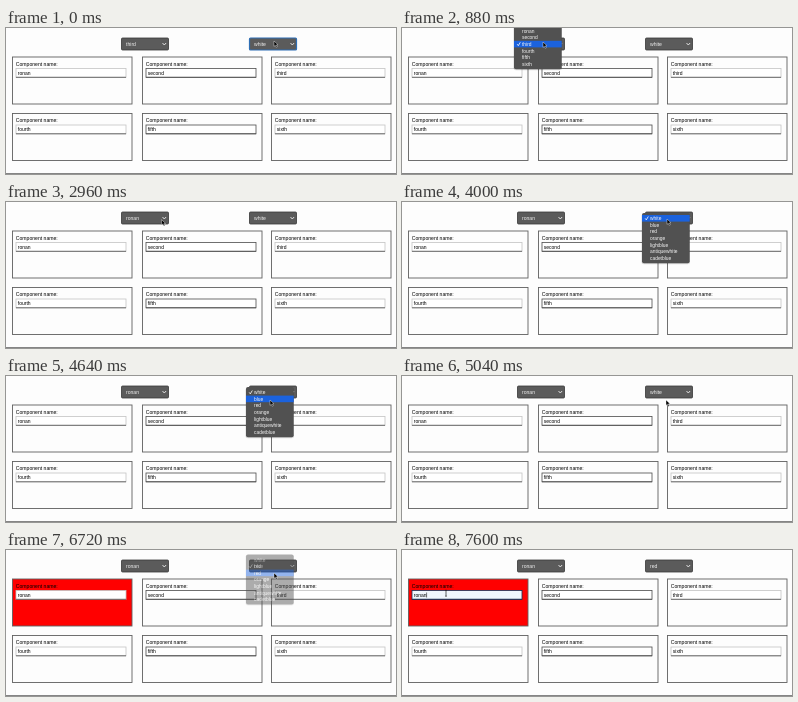
Write an HTML page that moves like this. It is 390 by 146 pixels and loops after 8 s.

```html
<!DOCTYPE html>
<html lang="en">
<head>
<meta charset="utf-8">
<title>Component colours</title>
<style>
html, body { margin: 0; width: 100%; height: 100%; overflow: hidden; background: #fdfdfd; }
svg { display: block; width: 390px; height: 146px; font: 5.1px "Liberation Sans", Arial, sans-serif; }
</style>
</head>
<body>
<svg id="stage" viewBox="0 0 390 146"></svg>
<script>
const stage = document.getElementById('stage');
const names = ['ronan', 'second', 'third', 'fourth', 'fifth', 'sixth'];
const colors = ['white', 'blue', 'red', 'orange', 'lightblue', 'antiquewhite', 'cadetblue'];
const LOOP = 8000, STEP = 80, ROW = 6.6;

// Pointer stops: time, x, y
const path = [
  [0, 268, 13], [80, 262, 13], [320, 140, 7], [480, 140, 9], [640, 141, 14],
  [1440, 141, 14], [1840, 141, 3], [2320, 141, 3], [2640, 142, 9], [2800, 143, 11],
  [3040, 160, 20], [3280, 194, 40], [3440, 225, 36], [3680, 265, 17],
  [4160, 265, 17], [4560, 264, 24], [5120, 264, 24], [5440, 267, 16],
  [5840, 267, 16], [6160, 268, 23], [6800, 268, 23], [7360, 44, 43], [LOOP, 44, 43]
];

// Menus: open, start of fade, end, left, top of first row, items, checked index
const menus = [
  [640, 2080, 2320, 112, -0.4, names, 2],
  [3840, 4800, 5040, 240, 13, colors, 0],
  [5520, 6560, 6800, 240, 6.4, colors, 1]
];

const rect = (x, y, w, h, fill, more = '') =>
  `<rect x="${x}" y="${y}" width="${w}" height="${h}" fill="${fill}" ${more}/>`;
const text = (x, y, s, fill = '#000', size = 5.1) =>
  `<text x="${x}" y="${y}" fill="${fill}" font-size="${size}">${s}</text>`;
const line = (d, color, width = 1) =>
  `<path d="${d}" fill="none" stroke="${color}" stroke-width="${width}"/>`;

function pointerAt(t) {
  const i = path.findIndex(p => p[0] > t);
  const [t0, x0, y0] = path[i - 1], [t1, x1, y1] = path[i];
  const u = (t - t0) / (t1 - t0), k = u * u * (3 - 2 * u);
  return [x0 + (x1 - x0) * k, y0 + (y1 - y0) * k];
}

function card(i, fill, focused) {
  const col = i % 3, x = [6.5, 136.5, 265.5][col], y = i < 3 ? 29 : 85.5;
  const ix = x + 3.5, iy = y + 11.5;
  const edge = focused ? '#182f55' : col === 1 ? '#4c4c4c' : '#c4c4c4';
  return rect(x, y, 119.5, 47, fill, 'stroke="#606060" stroke-width=".9"') +
    text(x + 3.3, y + 8.6, 'Component name:') +
    rect(ix, iy, 110, 8.8, focused ? '#f0f5fc' : '#fff', `stroke="${edge}" stroke-width=".8"`) +
    line(`M${ix} ${iy + 8.8}h110`, focused ? edge : '#505050', .8) +
    text(ix + 1.8, iy + 6.2, names[i], '#000', 5) +
    (focused ? line(`M${ix + 14.6} ${iy + 2}v5`, '#000', .5) : '');
}

function select(x, value, focused) {
  return rect(x, 10, 47, 12, '#5b5b5b',
      `rx="1" stroke="${focused ? '#2f6fb5' : '#383838'}" stroke-width="${focused ? 1.2 : .8}"`) +
    text(x + 4.5, 18, value, '#f2f2f2') +
    line(`M${x + 41} 15l1.8 2 1.8-2`, '#eee', .9);
}

function menu([open, fade, end, x, top, items, checked], t, py) {
  if (t < open || t >= end) return '';
  const alpha = t < fade ? 1 : 1 - (t - fade) / (end - fade) * .8;
  const h = items.length * ROW;
  const hot = Math.max(0, Math.min(items.length - 1, Math.floor((py - top) / ROW)));
  return `<g opacity="${alpha}">` +
    rect(x - .5, top - 1.5, 48.5, h + 4.5, '#000', 'rx="2.5" opacity=".15"') +
    rect(x, top - 2, 47.7, h + 4, '#515151', 'rx="2"') +
    rect(x, top + hot * ROW, 47.7, ROW, '#1b62dd') +
    items.map((s, i) => text(x + 8, top + i * ROW + 5.1, s, '#f5f5f5', 4.9)).join('') +
    line(`M${x + 3.2} ${top + checked * ROW + 3.4}l1.1 1.5 2-3.4`, '#fff', .8) + '</g>';
}

function pointer(x, y, beam) {
  if (beam) return line(`M${x - 1} ${y - 3}l1 .6 1-.6M${x} ${y - 2.4}v5.2M${x - 1} ${y + 3.4}l1-.6 1 .6`, '#222', .7);
  return `<path d="M${x} ${y}v5.4l1.3-1.1 1 2.1 1-.5-1-2 1.7-.1z" fill="#000" stroke="#fff" stroke-width=".4"/>`;
}

function draw(t) {
  const [px, py] = pointerAt(t);
  const tint = t < 5120 ? '#fdfdfd' : t < 6720 ? '#00f' : '#f00';
  const color = t < 5120 ? 'white' : t < 6720 ? 'blue' : 'red';
  stage.innerHTML =
    names.map((_, i) => card(i, i ? '#fdfdfd' : tint, !i && t >= 7520)).join('') +
    line('M0 145.5H390', '#858585') +
    select(115.5, t < 2240 ? 'third' : names[0], false) +
    select(243.5, color, t < 80) +
    menus.map(m => menu(m, t, py)).join('') +
    pointer(px, py, t >= 7280);
}

let last = -1;
function tick() {
  const t = Math.floor(performance.now() % LOOP / STEP) * STEP;
  if (t !== last) draw(last = t);
  requestAnimationFrame(tick);
}
tick();
</script>
</body>
</html>
```
